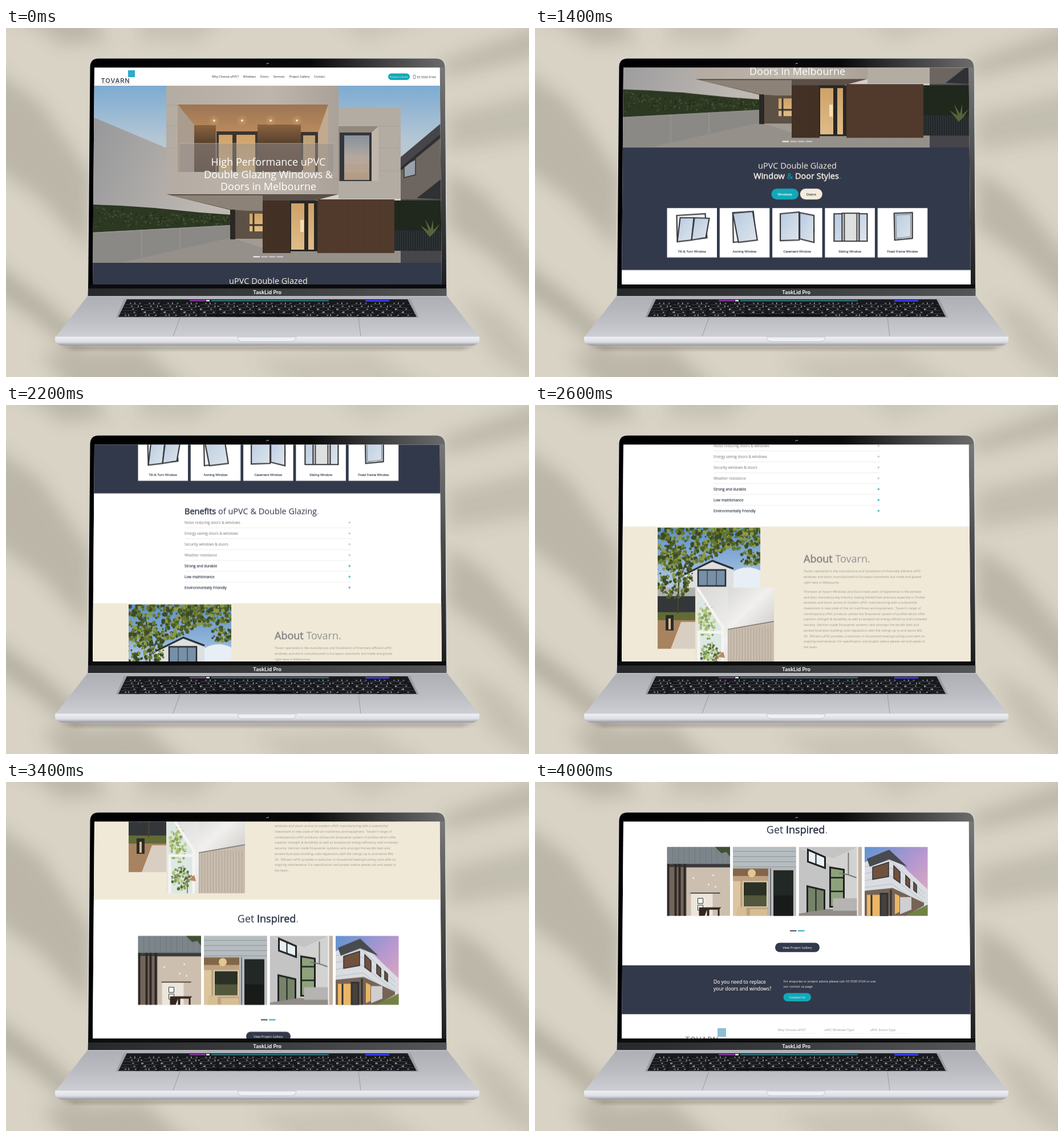
An HTML page for the animation above (5 s loop, 917 px wide and 611 px high).

```html
<!DOCTYPE html>
<html lang="en">
<head>
<meta charset="utf-8">
<title>Laptop website scroll</title>
<style>
html, body { margin: 0; width: 100%; height: 100%; overflow: hidden; background: #d8d3c5; }
svg { display: block; width: 917px; height: 611px; font-family: "Open Sans", sans-serif; }
text { white-space: pre; }
.mid { text-anchor: middle; }
.bold { stroke: currentColor; stroke-width: .5px; }
.semi { stroke: currentColor; stroke-width: .15px; }
.navy { fill: #283244; color: #283244; }
.white { fill: #fff; color: #fff; }
.cream { fill: #f7f0e0; color: #f7f0e0; }
.teal { fill: #12a9b9; color: #12a9b9; }
.grey { fill: #929292; color: #929292; }
#page { animation: scroll 5s infinite; }
@keyframes scroll {
  0% { transform: translateY(0); animation-timing-function: step-end; }
  16% { transform: translateY(0); animation-timing-function: steps(15, end); }
  76% { transform: translateY(-1008.75px); animation-timing-function: step-end; }
  80%, 100% { transform: translateY(-1030px); }
}
</style>
</head>
<body>
<svg viewBox="0 0 917 611">
  <defs>
    <filter id="blur" x="-50%" y="-50%" width="200%" height="200%"><feGaussianBlur stdDeviation="15"/></filter>
    <filter id="soft" x="-50%" y="-50%" width="200%" height="200%"><feGaussianBlur stdDeviation="3"/></filter>
    <clipPath id="screen"><path d="M155 69.5H760.5L764 449H152Z"/></clipPath>
    <clipPath id="tile"><rect width="110.5" height="121"/></clipPath>
    <clipPath id="garden"><rect x="215" y="820" width="180" height="212"/></clipPath>
    <clipPath id="room"><rect x="284" y="925" width="135" height="144"/></clipPath>
    <linearGradient id="bezel"><stop stop-color="#000"/><stop offset=".62" stop-color="#090909"/><stop offset=".8" stop-color="#3b3b3b"/><stop offset="1" stop-color="#6c6c6b"/></linearGradient>
    <linearGradient id="side" x2="0" y2="1"><stop stop-color="#777"/><stop offset=".45" stop-color="#4a4a4a"/><stop offset="1" stop-color="#1d1d1e"/></linearGradient>
    <linearGradient id="chin"><stop stop-color="#272829"/><stop offset=".5" stop-color="#3b3c3e"/><stop offset="1" stop-color="#545557"/></linearGradient>
    <linearGradient id="deck" x2="0" y2="1"><stop stop-color="#adafb5"/><stop offset=".5" stop-color="#bbbcc2"/><stop offset="1" stop-color="#cecfd5"/></linearGradient>
    <linearGradient id="lip" x2="0" y2="1"><stop stop-color="#f0f0f4"/><stop offset=".6" stop-color="#dcdde3"/><stop offset="1" stop-color="#94959d"/></linearGradient>
    <linearGradient id="sky" x2="0" y2="1"><stop stop-color="#7dabd2"/><stop offset=".3" stop-color="#b4c6d4"/><stop offset=".6" stop-color="#d3cfc9"/></linearGradient>
    <linearGradient id="wall" x2="1" y2=".3"><stop stop-color="#96979a"/><stop offset="1" stop-color="#bfb9b2"/></linearGradient>
    <linearGradient id="concrete" x2="1"><stop stop-color="#b4aca2"/><stop offset=".6" stop-color="#beb6ac"/><stop offset="1" stop-color="#aaa198"/></linearGradient>
    <linearGradient id="ceilingWood" x2="0" y2="1"><stop stop-color="#9c7553"/><stop offset="1" stop-color="#b98a5d"/></linearGradient>
    <linearGradient id="wood" x2="0" y2="1"><stop stop-color="#8a633f"/><stop offset=".4" stop-color="#58402d"/><stop offset="1" stop-color="#443023"/></linearGradient>
    <linearGradient id="warm" x2="0" y2="1"><stop stop-color="#cfa268"/><stop offset="1" stop-color="#dfbd88"/></linearGradient>
    <linearGradient id="pane" x2="0" y2="1"><stop stop-color="#86929b"/><stop offset=".5" stop-color="#b5a89e"/><stop offset="1" stop-color="#b39a80"/></linearGradient>
    <linearGradient id="glass" x2="1" y2="1"><stop stop-color="#b7cbe2"/><stop offset="1" stop-color="#dfe5ea"/></linearGradient>
    <linearGradient id="day" x2="0" y2="1"><stop stop-color="#5c91cc"/><stop offset=".6" stop-color="#c5d6e8"/></linearGradient>
    <linearGradient id="dusk" x2="1" y2="1"><stop stop-color="#5f94d2"/><stop offset=".5" stop-color="#b697cf"/><stop offset="1" stop-color="#efb4b8"/></linearGradient>
    <linearGradient id="ceiling" x2="1" y2="1"><stop stop-color="#d8d8d7"/><stop offset=".5" stop-color="#f1f0ee"/><stop offset="1" stop-color="#cfcdca"/></linearGradient>
  </defs>

  <!-- Wall with soft window shadows -->
  <rect width="917" height="611" fill="#d8d3c5"/>
  <g filter="url(#blur)" fill="#8d8879" opacity=".46">
    <path d="M-40 60L60 130L150 260L145 390L60 300L-40 230Z" opacity=".8"/>
    <path d="M-30 -30H140L180 20L100 30L50 -5Z" opacity=".8"/>
    <path d="M-40 395L60 470L140 540L120 570L50 510L-40 450Z"/>
    <path d="M60 570L240 560L330 640L120 640Z" opacity=".8"/>
    <path d="M430 580L640 565L760 640H520Z" opacity=".4"/>
    <path d="M240 -30H400L330 25L230 20Z" opacity=".5"/>
    <path d="M560 -30H760L630 25Z" opacity=".4"/>
    <path d="M950 -10L760 60L775 85L950 45Z" opacity=".75"/>
    <path d="M950 110L775 150L775 215L950 190Z" opacity=".6"/>
    <path d="M775 250L840 290L950 420L950 500L850 400L775 350Z" opacity=".8"/>
    <path d="M800 470L870 500L950 590V640L850 570Z" opacity=".5"/>
  </g>
  <path d="M95 556H822L800 563H120Z" fill="#77746a" opacity=".5" filter="url(#soft)"/>

  <!-- Lid -->
  <path d="M146 67Q147 52 161 52H755Q770 52 771 67L774 470H142Z" fill="#d2d2d0"/>
  <path d="M147.500 68Q148 53.500 162 53.500H754Q768.500 53.500 769.500 68L772 470H144Z" fill="url(#bezel)"/>
  <path d="M760 69H769.500L772 456H763Z" fill="url(#side)"/>
  <path d="M144 449H772V456H144Z" fill="#0c0c0d"/>
  <path d="M144 456H772.500V470H143.500Z" fill="url(#chin)"/>
  <circle cx="457" cy="62.500" r="1" fill="#777"/><circle cx="459.500" cy="62" r="1" fill="#bbb"/>
  <text class="mid white semi" x="458" y="466.300" style="font:500 9px Inter,sans-serif">TaskLid Pro</text>

  <!-- Base -->
  <path d="M143 469.500H773.500L830 542H86Z" fill="url(#deck)"/>
  <path d="M143 470H773" stroke="#d7d8dd" stroke-width="1"/>
  <path d="M305 507L293 540M618 507L622 540" stroke="#85878f" stroke-width=".7"/>
  <path d="M86 540.500H830V547Q829 554 819 556H98Q87 554 86 547Z" fill="url(#lip)"/>
  <path d="M406 541H509Q508 549 501 549H414Q407 549 406 541Z" fill="#eff0f5" stroke="#a7a9b2" stroke-width=".6"/>
  <path d="M207 474.500H709L724 506.500H193Z" fill="#9c9ea6"/>
  <path d="M212 475H704L720 506H197Z" fill="#17181b"/>
  <g id="keys"></g>
  <g fill="none" stroke-width="1.800">
    <path d="M213 477.300H705" stroke="#1d2228"/>
    <path d="M322 477.300H350" stroke="#a844c0"/>
    <path d="M360 477.300H566" stroke="#3a8f97"/>
    <path d="M630 477.600H672" stroke="#3b3bec" stroke-width="3"/>
    <path d="M351 477.300H357" stroke="#eee" stroke-width="2.500"/>
  </g>

  <g clip-path="url(#screen)">
    <rect x="150" y="68" width="616" height="384" fill="#fff"/>
    <g id="page">
      <rect x="150" y="60" width="616" height="1450" fill="#fff"/>

      <!-- Header -->
      <rect x="214" y="74" width="12" height="12" fill="#2fa9cd"/>
      <text class="navy" x="166.500" y="95.500" style="font:500 11px Inter,sans-serif;letter-spacing:1px">TOVARN</text>
      <text class="grey" x="167" y="99.300" font-size="3.300" letter-spacing=".55">uPVC WINDOWS &amp; DOORS</text>
      <g id="nav" class="navy" font-size="5.300"></g>
      <rect class="teal" x="670" y="79.500" width="38" height="11.500" rx="5.700"/>
      <text class="mid white" x="689" y="86.800" font-size="4.100">Request a Quote</text>
      <rect x="714.300" y="82.300" width="3.600" height="6.400" rx=".7" fill="none" stroke="#555" stroke-width=".7"/>
      <text class="navy" x="720.500" y="87.500" font-size="5.300">03 5550 0164</text>

      <!-- Hero -->
      <g id="hero">
        <rect x="150" y="101" width="616" height="310" fill="url(#sky)"/>
        <path d="M150 155L281 210V291L400 320V340H150Z" fill="url(#wall)"/>
        <path d="M150 360H766V411H150Z" fill="#a29b93"/>
        <path d="M150 395L395 367L450 385H766V411H150Z" fill="#96908a"/>
        <path d="M150 309L200 311L260 315L340 323L395 327V346L150 359Z" fill="#2c3822"/>
        <g id="hedge"></g>
        <path d="M150 358L395 345V367L205 410H150Z" fill="#8a8985"/>
        <path d="M150 358.500L395 345.500M238 354V402M305 350V387" stroke="#a5a39d" stroke-width=".8" fill="none"/>
        <path d="M281 291H583L542 302H450V324L395 319Z" fill="#5b5047"/>
        <path d="M290 293H450V322L395 318Z" fill="#8d8277"/>
        <path d="M402 320H452V369H402Z" fill="#5d5145"/>
        <path d="M427 325H450V356H427Z" fill="url(#warm)"/>
        <path d="M434 325V356M427 345H450" stroke="#3d3126" stroke-width="3"/>
        <path d="M393 318H402V370H393Z" fill="#2a2725"/>
        <path d="M692 226L766 164V411H692Z" fill="#45454a"/>
        <path d="M692 250L766 190V300H692Z" fill="#6d6660"/>
        <path d="M698 240L718 230V257L698 262Z" fill="#98a2aa" stroke="#333" stroke-width="1.500"/>
        <path d="M692 247L766 185" stroke="#2f2d2d" stroke-width="4"/>
        <path d="M720 298L766 262V300Z" fill="#303134"/>
        <path d="M681 302H766V360H681Z" fill="#20281d"/>
        <path d="M681 354H766V390H681Z" fill="#24282b"/>
        <path d="M683 372H766" stroke="#353b3e" stroke-width="34" stroke-dasharray="1 3"/>
        <path d="M743 366L727 346L741 355L735 335L745 352L749 335L749 354L761 343L751 358Z" fill="#55653a"/>
        <path d="M583 139L692 140V299H583Z" fill="#b3aca2"/>
        <path d="M583 172H653V268H583Z" fill="#92887d"/>
        <path d="M641 183L653 172V268H641Z" fill="#c0b7ab"/>
        <path d="M585 183H641V268H585Z" fill="#33363b"/>
        <path d="M593 188H637V266H593Z" fill="url(#pane)"/>
        <path d="M596 236H634M596 250H634" stroke="#c9ad8e" stroke-width="3" opacity=".35"/>
        <path d="M281 101H583V291H281Z" fill="url(#concrete)"/>
        <path d="M281 135H301M281 171H301M281 210H301M655 172H692M655 210H692M655 250H692" stroke="#a0988f" stroke-width=".6"/>
        <path d="M301 134H565V252H301Z" fill="#c2aa8e"/>
        <path d="M301 134H565L548 182H370L330 170Z" fill="url(#ceilingWood)"/>
        <path d="M301 134L330 170V252H301Z" fill="#aa9c8e"/>
        <path d="M330 170H368V252H330Z" fill="url(#wood)"/>
        <path d="M369 181H441V252H369Z" fill="#3c342d"/>
        <path d="M373 187H397V252H373ZM404 187H437V252H404Z" fill="url(#warm)"/>
        <path d="M441 169H517V252H441Z" fill="url(#wood)"/>
        <path d="M517 182H547V252H517Z" fill="#3c352e"/>
        <path d="M521 188H542V252H521Z" fill="#c0a078"/>
        <g id="spots"></g>
        <path d="M305 202H574V252H305Z" fill="#96908f" opacity=".52"/>
        <path d="M305 202H574" stroke="#c7bfc3" stroke-width=".6"/>
        <path d="M450 302H499V394H450Z" fill="#433126"/>
        <path d="M546 300H681V394H546Z" fill="#523b2d"/>
        <path d="M547 347H681M451 348H498" stroke="#392820" stroke-width="92" stroke-dasharray=".6 3.400" opacity=".3"/>
        <path d="M498 302H546V391H498Z" fill="#292725"/>
        <path d="M500 307H523V388H500ZM530 307H540V388H530Z" fill="url(#warm)"/>
        <path d="M516 336H522V357H516Z" fill="#f5e0b3"/>
      </g>
      <g class="mid white" font-size="18">
        <text x="460" y="241.300">High Performance uPVC</text>
        <text x="460" y="262.800">Double Glazing Windows &amp;</text>
        <text x="460" y="284.300">Doors in Melbourne</text>
      </g>
      <path d="M433.500 400.500H445" stroke="#fff" stroke-width="1.800"/>
      <path d="M447.500 400.500H486.500" stroke="#fff" stroke-width="1.800" stroke-dasharray="11.200 2.500" opacity=".55"/>

      <!-- Styles -->
      <rect x="150" y="411" width="616" height="214.500" fill="#32394b"/>
      <text class="mid cream" x="460" y="448" font-size="14.500">uPVC Double Glazed</text>
      <text class="mid cream bold" x="460" y="465.800" font-size="14.500">Window <tspan class="teal" stroke="none">&amp;</tspan> Door Styles<tspan class="teal" stroke="none">.</tspan></text>
      <rect class="teal" x="414.500" y="483" width="47.500" height="19" rx="9.500"/>
      <rect x="464.800" y="483" width="39" height="19" rx="9.500" fill="#f4ebda"/>
      <text class="mid white semi" x="438.200" y="494.600" font-size="6">Windows</text>
      <text class="mid navy semi" x="484.300" y="494.600" font-size="6">Doors</text>
      <g id="cards"></g>

      <!-- Benefits -->
      <text class="navy" x="313" y="662.300" font-size="14.500"><tspan class="bold">Benefits</tspan> of uPVC &amp; Double Glazing<tspan class="grey">.</tspan></text>
      <g id="benefits" font-size="6.400"></g>

      <!-- About -->
      <rect x="150" y="818" width="616" height="262" fill="#f0e9d8"/>
      <g clip-path="url(#garden)">
        <rect x="215" y="820" width="180" height="212" fill="url(#day)"/>
        <path d="M335 905Q365 880 395 895V930H335Z" fill="#e8eef5"/>
        <path d="M262 902L311 878L348 892V935H262Z" fill="#dddfe0"/>
        <path d="M262 902L311 878L348 892" fill="none" stroke="#24282b" stroke-width="3"/>
        <path d="M286 894H334V922H286Z" fill="#7790a8" stroke="#25292c" stroke-width="2.500"/>
        <path d="M302 894V922M318 894V922" stroke="#25292c"/>
        <path d="M215 925H286V940H215Z" fill="#aeb0ad"/>
        <path d="M215 940H286V972H215Z" fill="#33373a"/>
        <path d="M215 970H286V1032H215Z" fill="#a8835f"/>
        <path d="M215 968H286V982H215Z" fill="#626b37"/>
        <path d="M238 1032L256 985H286V1032Z" fill="#d9cec2"/>
        <path d="M229 973H243V1000H229Z" fill="#2c2b29"/><path d="M234 979H238V998H234Z" fill="#d9bd8e"/>
        <path d="M250 970L253 890L246 850M253 910L270 870" stroke="#4b4232" stroke-width="2.500" fill="none"/>
        <g id="canopy"></g>
      </g>
      <rect x="281" y="925" width="138" height="144" fill="#e9e4d6"/>
      <g clip-path="url(#room)">
        <rect x="284" y="925" width="135" height="144" fill="url(#ceiling)"/>
        <path d="M284 933L329 998V1069H284Z" fill="#dce8e4"/>
        <g id="trees"></g>
        <path d="M284 925L331 997M284 1003H331M329 995V1069M287 1003V1069" stroke="#f5f4f2" stroke-width="5" fill="none"/>
        <path d="M338 998L419 984V1069H338Z" fill="#c7bcad"/>
        <path d="M338 1035H417" stroke="#9c9081" stroke-width="82" stroke-dasharray="1 4" opacity=".5"/>
        <path d="M338 998L419 984V920H338Z" fill="url(#ceiling)"/>
        <path d="M338 998L419 984" stroke="#4b4740"/>
        <path d="M318 1069V1043L325 1038L331 1046" stroke="#8a603d" stroke-width="1.500" fill="none"/>
        <path d="M320 1046L330 1037L333 1048Z" fill="#b78860"/>
      </g>
      <text class="grey" x="471" y="881.300" font-size="18"><tspan class="bold" style="fill:#828280;color:#828280">About</tspan> Tovarn.</text>
      <g id="story" fill="#96958f" font-size="5.550"></g>

      <!-- Gallery -->
      <text class="mid navy" x="459.500" y="1120.200" font-size="18">Get <tspan class="bold">Inspired</tspan><tspan class="grey">.</tspan></text>
      <g transform="translate(231.500 1143.500)" clip-path="url(#tile)">
        <rect width="111" height="121" fill="#cdbfaf"/>
        <rect width="111" height="31" fill="#7c8589"/>
        <path d="M0 15H111" stroke="#697378" stroke-width="30" stroke-dasharray=".7 9"/>
        <path d="M84 0H111V18L104 9L95 11Z" fill="#405035"/>
        <path d="M0 30H111V36H0Z" fill="#393a3a"/>
        <path d="M0 36H34V121H0Z" fill="#74655a"/>
        <path d="M2 30V121M15 30V121M22 30V121M31 30V121" stroke="#2c2927" stroke-width="4"/>
        <path d="M42 82H80V121H42Z" fill="#ebe5dc"/><path d="M41 81H93" stroke="#302c29" stroke-width="1.500"/>
        <path d="M54 90H63V99H54ZM54 102H63V111H54Z" fill="#fff" stroke="#333"/>
        <path d="M68 106H95L92 109V121H89V110H74V121H70V110L66 121H56V106H62Z" fill="#34261f"/>
        <path d="M45 55H47M72 66H74M84 70H86M80 50H82" stroke="#fff" stroke-width="2.500"/>
      </g>
      <g transform="translate(347 1143.500)" clip-path="url(#tile)">
        <rect width="111" height="121" fill="#bea27f"/>
        <rect width="111" height="38" fill="#b6bdc1"/>
        <path d="M0 8H111M0 17H111M0 26H111M0 35H111" stroke="#8d969b"/>
        <path d="M0 38H66V51H0Z" fill="#82664a"/>
        <path d="M18 61H60V105H18Z" fill="#2b3124" stroke="#dfd0b6" stroke-width="2"/>
        <path d="M19 85H59V104H19Z" fill="#53573c"/>
        <path d="M0 60H13V121H0Z" fill="#dcc69f"/>
        <path d="M8 105H24V121H6ZM30 109H61V121H30Z" fill="#d7bd93"/>
        <circle cx="33" cy="46" r="7" fill="#f6d79d" opacity=".85"/>
        <path d="M62 38H111V121H62Z" fill="#b9bcbe"/><path d="M71 41H106V121H71Z" fill="#222825"/>
        <path d="M72 85H105V121H72Z" fill="#181b1a"/><path d="M66 38V121" stroke="#575b5e" stroke-width="1.500"/>
      </g>
      <g transform="translate(462.500 1143.500)" clip-path="url(#tile)">
        <rect width="111" height="121" fill="#c3c4c3"/>
        <path d="M0 0L60 20L103 0V121H55V32Z" fill="#d2d2d0"/>
        <path d="M16 5L46 18V37L16 26Z" fill="#e8f0f3" stroke="#1e2122" stroke-width="3"/><path d="M30 11V32" stroke="#1e2122" stroke-width="2"/>
        <path d="M55 36L79 40V105H55Z" fill="#8da27a" stroke="#1f2221" stroke-width="3"/><path d="M55 54H79M55 78H79" stroke="#1f2221" stroke-width="2.500"/>
        <path d="M15 69L45 76V113L15 117Z" fill="#768369" stroke="#222524" stroke-width="3"/><path d="M30 72V115" stroke="#222524" stroke-width="2"/>
        <path d="M0 117L50 109H103V121H0Z" fill="#918c87"/><path d="M60 90H103V112H60Z" fill="#b5b4b2"/>
        <path d="M87 10V48M71 46L87 49L101 54" stroke="#777" stroke-width="2" fill="none"/>
        <path d="M103 0H111V121H103Z" fill="#c3b2a2"/><path d="M103 0V121" stroke="#f4f2ef" stroke-width="2"/>
      </g>
      <g transform="translate(578 1143.500)" clip-path="url(#tile)">
        <rect width="111" height="121" fill="url(#dusk)"/>
        <path d="M0 27L43 8L76 42L110 74V104L72 121H0Z" fill="#d9dce0"/>
        <path d="M0 35L45 23L105 82M0 47L46 37L105 90M0 59L46 51L105 98M0 71L48 65L100 103" fill="none" stroke="#afb5bb" stroke-width=".8"/>
        <path d="M4 21L43 5L75 35L43 22L9 35Z" fill="#474a4e"/>
        <path d="M14 36L42 27V52L14 57ZM51 33L62 44V63L51 55ZM72 50L79 57V72L72 66ZM86 62L91 67V80L86 76Z" fill="#70513e" stroke="#303234" stroke-width="1.500"/>
        <path d="M0 77L49 72L104 98V103L72 121H0Z" fill="#756456"/>
        <path d="M4 84H28V121H4ZM53 82L61 86V114L53 118Z" fill="#ebb664"/>
        <path d="M28 82H40V121H28ZM12 84V121M46 75V121" stroke="#303236" stroke-width="3" fill="#46413c"/>
        <path d="M62 88H82V110L62 118Z" fill="#cfced0"/><path d="M70 121L111 101V121Z" fill="#718343"/>
      </g>
      <path d="M447 1290.500H458.500" stroke="#3a4050" stroke-width="1.900"/><path d="M461 1290.500H472.500" stroke="#12a9b9" stroke-width="1.900"/>
      <rect x="421" y="1311.500" width="78" height="16.300" rx="8.100" fill="#32394b"/>
      <text class="mid white" x="460" y="1321.700" font-size="5.600">View Project Gallery</text>

      <!-- Contact and footer -->
      <rect x="150" y="1351" width="616" height="85.500" fill="#32394b"/>
      <g class="cream semi" font-size="8.500"><text x="313" y="1382.800">Do you need to replace</text><text x="313" y="1394.600">your doors and windows?</text></g>
      <g class="cream" font-size="5.550"><text x="435.500" y="1380.500">For enquiries or project advice please call: 03 5550 0164 or use</text><text x="435.500" y="1390.100">our contact us page</text></g>
      <rect class="teal" x="435.500" y="1399.500" width="48.500" height="14.500" rx="7.250"/>
      <text class="mid white" x="459.800" y="1408.700" font-size="5.600">Contact Us</text>
      <rect x="320" y="1461" width="15" height="15" fill="#8fbdd5"/>
      <text x="263" y="1486" fill="#777" style="font:500 13px Inter,sans-serif;letter-spacing:1px">TOVARN</text>
      <g class="grey" font-size="5.600"><text x="425.500" y="1465.500">Why Choose uPVC?</text><text x="507" y="1465.500">uPVC Windows Type</text><text x="587.500" y="1465.500">uPVC Doors Type</text></g>
      <path d="M425.500 1470H494M507 1470H575M587.500 1470H656" stroke="#eee" stroke-width=".7"/>
    </g>
  </g>
</svg>
<script>
const add = (id, markup) => document.getElementById(id).insertAdjacentHTML('beforeend', markup);
const text = (x, y, s, attrs = '') => `<text x="${x}" y="${y}" ${attrs}>${s.replace(/&/g, '&amp;')}</text>`;

let seed = 29;
const random = () => (seed = seed * 16807 % 2147483647) / 2147483647;

// Scatters small leaves over an ellipse.
function leaves(id, cx, cy, rx, ry, count, size, colours) {
  let out = '';
  for (let i = 0; i < count; i++) {
    const angle = random() * Math.PI * 2, reach = Math.sqrt(random());
    out += `<circle cx="${(cx + Math.cos(angle) * rx * reach).toFixed(1)}" cy="${(cy + Math.sin(angle) * ry * reach).toFixed(1)}"
      r="${(size * (.5 + random())).toFixed(1)}" fill="${colours[i % colours.length]}"/>`;
  }
  add(id, out);
}

const greens = ['#66792f', '#4b5c27', '#8b9a48', '#3c4a25'];
leaves('canopy', 265, 835, 75, 48, 480, 2.8, greens);
leaves('canopy', 240, 900, 38, 45, 210, 2.4, greens);
leaves('canopy', 355, 835, 50, 22, 200, 2.6, greens);
leaves('canopy', 378, 873, 18, 13, 60, 2.2, greens);
leaves('trees', 301, 985, 15, 32, 90, 2, ['#a4bd68', '#8aa25a', '#c2d395']);
leaves('trees', 306, 1042, 16, 22, 80, 2, ['#809b50', '#54693a', '#b2c681']);
for (let x = 160; x < 392; x += 9)
  leaves('hedge', x, 332 + (x - 160) * .018, 7, 18 - (x - 160) * .04, 9, 1.4, ['#3b4829', '#232e1c', '#465030']);

for (const x of [365, 414, 464, 510])
  add('spots', `<circle cx="${x}" cy="162" r="6" fill="#ffd88e" opacity=".3" filter="url(#soft)"/><circle cx="${x}" cy="162" r="1.8" fill="#fff3cd"/>`);

const nav = { 361: 'Why Choose uPVC?', 415.5: 'Windows', 445.7: 'Doors', 468.5: 'Services', 496.5: 'Project Gallery', 540: 'Contact' };
for (const x in nav) add('nav', text(x, 87.4, nav[x]));

// Each window is drawn in its card's own coordinates.
const pane = (d, fill = 'url(#glass)') => `<path d="${d}" fill="${fill}" stroke="#3b3b3e" stroke-width="2.2"/>`;
const windows = {
  'Tilt & Turn Window': pane('M17 13L67 10L70 52L18 57Z', '#eef2f5') + pane('M23 17L47 17L43 56L18 59Z') + pane('M48 17L74 18L68 52L43 56Z'),
  'Awning Window': pane('M23 8L59 6L64 55L24 60Z', '#eef2f5') + pane('M23 9L58 6L66 56L33 60Z'),
  'Casement Window': pane('M14 10L47 7V56L14 57Z') + pane('M48 8L73 13V60L48 54Z') + '<path d="M73 34V42" stroke="#333" stroke-width="2"/>',
  'Sliding Window': pane('M16 10H74V58H16Z') + pane('M30 9H60V58H30Z', '#dedfdf') + '<path d="M34 10V57M56 10V57" stroke="#46464a" stroke-width="2"/>',
  'Fixed Frame Window': pane('M29 9L61 8V53L30 56Z') + '<path d="M32 12L58 11V50L33 53Z" fill="none" stroke="#777"/>'
};
Object.entries(windows).forEach(([label, art], i) => add('cards',
  `<g transform="translate(${231.5 + i * 92.3} 517)"><rect width="87.500" height="86.500" fill="#fff"/>${art}${text(43.7, 78, label, 'class="mid navy semi" font-size="5.6"')}</g>`));

const benefits = ['Noise reducing doors & windows', 'Energy saving doors & windows', 'Security windows & doors',
  'Weather resistance', 'Strong and durable', 'Low maintenance', 'Environmentally Friendly'];
benefits.forEach((label, i) => {
  const y = 676.5 + i * 19, ready = i > 3;
  add('benefits', text(313, y + 2.2, label, `class="${ready ? 'navy' : 'grey'} semi"`) +
    `<path d="M600 ${y}H604.600M602.300 ${y - 2.3}v4.600" stroke="${ready ? '#12a9b9' : '#b5bcc0'}" stroke-width=".9"/>` +
    (i < 6 ? `<path d="M313 ${y + 9.3}H606" stroke="#e7e7e7" stroke-width=".7"/>` : ''));
});

const story = `Tovarn specialise in the manufacture and installation of thermally efficient uPVC
windows and doors manufactured to European standards, but made and glazed
right here in Melbourne.
The team at Tovarn Windows and Doors have years of experience in the window
and door manufacturing industry, having shifted their previous expertise in Timber
windows and doors across to modern uPVC manufacturing with a substantial
investment in new state of the art machinery and equipment.  Tovarn's range of
contemporary uPVC products utilises the Strauvener system of profiles which offer
superior strength & durability as well as exceptional energy efficiency and increased
security. German made Strauvener systems rank amongst the worlds best and
exceed Australian building code regulations with fire ratings up to and above BAL
29.  Efficient uPVC provides a reduction in household heating/cooling costs with no
ongoing maintenance. For specification and project advice please call and speak to
the team.`;
story.split('\n').forEach((line, i) => add('story', text(471, 898.2 + i * 9.7 + (i > 2 ? 6.6 : 0), line)));

// Keyboard rows widen towards the front.
for (let row = 0; row < 5; row++) {
  const y = 482 + row * 5.2, inset = 209 - row * 2.8, end = 917 - inset, step = 33 + row * .6;
  add('keys', `<path d="M${inset} ${y + 2.3}H${end}" stroke="#5d6067" stroke-width=".6" stroke-dasharray="${step - 6} 6"/>
    <path d="M${inset + 16} ${y}H${end - 14}" stroke="#9a9da6" stroke-width="3" stroke-dasharray="1.6 ${step - 1.6}" stroke-dashoffset="${-row * 9}"/>
    <path d="M${inset + 8} ${y}H${end - 8}" stroke="#b4b6bd" stroke-width="1.2" stroke-dasharray="3 ${step / 2 - 3}" stroke-dashoffset="${-row * 5}"/>`);
}
add('keys', '<path d="M352 503H502" stroke="#111216" stroke-width="4"/>');
</script>
</body>
</html>
```
